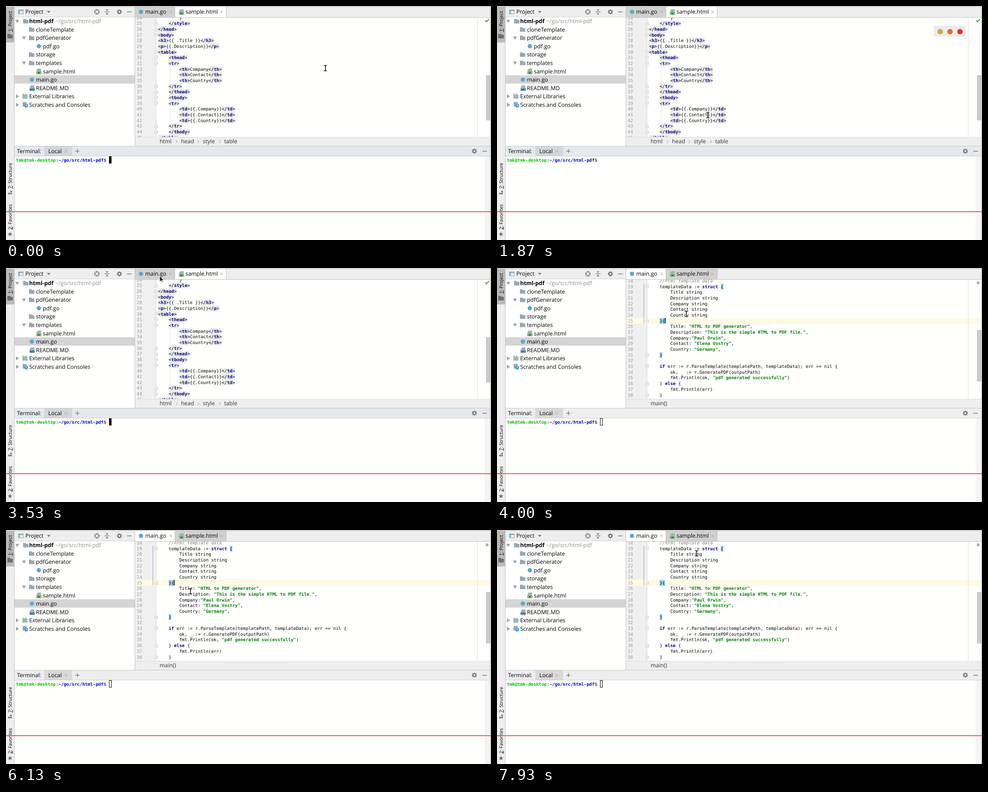
Write an HTML page with a canvas that moves like this. It is 1078x520 px and loops after 8000 ms.

```html
<!DOCTYPE html>
<html lang="en">
<head>
<meta charset="utf-8">
<title>IDE session</title>
<style>
html, body { margin: 0; width: 100%; height: 100%; overflow: hidden; background: #fffffd; }
canvas { display: block; }
</style>
</head>
<body>
<canvas id="stage" width="1078" height="520"></canvas>
<script>
const ctx = document.getElementById('stage').getContext('2d');
ctx.textRendering = 'geometricPrecision';

const LOOP = 8000, POPUP = 270, SWITCH = 3600;
const CW = 5.9, LH = 12.67, CODE_X = 338;
const UI = '"Open Sans", "Noto Sans", sans-serif';
const MONO = '"DejaVu Sans Mono", monospace';
const PAPER = '#fffffd', PANEL = '#eeeeee', EDGE = '#bfbfbf', ICON = '#6e6e6e';

// Pointer path: time, x, y
const PATH = [
  [0, 710, 138], [70, 706, 138], [450, 540, 144], [870, 458, 152], [1130, 453, 208],
  [1730, 458, 239], [2000, 477, 244], [2200, 470, 238], [2340, 470, 238], [2600, 470, 183],
  [3200, 372, 31], [3370, 338, 14], [3500, 340, 16], [4000, 421, 102], [4140, 421, 102],
  [4500, 373, 72], [4800, 386, 58], [4940, 387, 56], [5400, 405, 79], [5800, 416, 110],
  [5950, 421, 120], [6130, 410, 136], [6210, 410, 136], [6600, 369, 166], [6870, 386, 193],
  [7070, 390, 200], [7660, 460, 100], [7930, 444, 52], [8000, 442, 52]
];

const HTML_CODE = [
  '        }', '    </style>', '</head>', '<body>', '<h3>{{ .Title }}</h3>',
  '<p>{{.Description}}</p>', '<table>', '    <thead>', '    <tr>',
  '        <th>Company</th>', '        <th>Contact</th>', '        <th>Country</th>',
  '    </tr>', '    </thead>', '    <tbody>', '    <tr>',
  '        <td>{{.Company}}</td>', '        <td>{{.Contact}}</td>', '        <td>{{.Country}}</td>',
  '    </tr>', '    </tbody>', '</table>'
];
const GO_CODE = [
  '    //html template data', '    templateData := struct {', '        Title string',
  '        Description string', '        Company string', '        Contact string',
  '        Country string', '    }{', '        Title: "HTML to PDF generator",',
  '        Description: "This is the simple HTML to PDF file.",',
  '        Company:"Paul Orwin",', '        Contact: "Elena Vostry",', '        Country: "Germany",',
  '    }', '', '    if err := r.ParseTemplate(templatePath, templateData); err == nil {',
  '        ok, _ := r.GeneratePDF(outputPath)', '        fmt.Println(ok, "pdf generated successfully")',
  '    } else {', '        fmt.Println(err)', '    }', '}'
];

function rect(x, y, w, h, color) {
  ctx.fillStyle = color;
  ctx.fillRect(x, y, w, h);
}

function dot(x, y, r, color) {
  ctx.fillStyle = color;
  ctx.beginPath();
  ctx.arc(x, y, r, 0, 7);
  ctx.fill();
}

function poly(points, fill, stroke, width = 1) {
  ctx.beginPath();
  points.forEach(([x, y], i) => i ? ctx.lineTo(x, y) : ctx.moveTo(x, y));
  if (fill) {
    ctx.closePath();
    ctx.fillStyle = fill;
    ctx.fill();
  }
  if (stroke) {
    ctx.strokeStyle = stroke;
    ctx.lineWidth = width;
    ctx.stroke();
  }
}

function label(str, x, mid, color = '#000', weight = 400, size = 12.4) {
  ctx.font = `${weight} ${size}px ${UI}`;
  ctx.fillStyle = color;
  ctx.fillText(str, x, mid + size * 0.36);
}

function mono(str, x, mid, color = '#000', weight = 400) {
  ctx.font = `${weight} 9.8px ${MONO}`;
  ctx.fillStyle = color;
  ctx.fillText(str, x, mid + 3.4);
}

// Small icons

function folder(x, y, color = '#9aa7b0') {
  poly([[x - 6, y - 5], [x - 1, y - 5], [x + 1, y - 3], [x + 6, y - 3], [x + 6, y + 5], [x - 6, y + 5]], color);
}

function page(x, y, badge, letters) {
  poly([[x - 2, y - 6], [x + 5, y - 6], [x + 5, y + 1], [x - 5, y + 1], [x - 5, y - 3]], '#a5b0b8');
  rect(x - 6, y, 12, 6.5, badge);
  label(letters, x - (letters.length > 1 ? 5 : 2.5), y + 3.2, '#253525', 700, 6.5);
}

function arrow(x, y, open) {
  poly(open ? [[x - 4.5, y - 3], [x + 4.5, y - 3], [x, y + 4]]
            : [[x - 3, y - 4.5], [x + 4, y], [x - 3, y + 4.5]], '#a3a3a3');
}

function gear(x, y) {
  ctx.strokeStyle = ICON;
  ctx.lineWidth = 2;
  ctx.beginPath();
  ctx.arc(x, y, 3.2, 0, 7);
  ctx.stroke();
  for (let i = 0; i < 8; i++) {
    const c = Math.cos(i * Math.PI / 4), s = Math.sin(i * Math.PI / 4);
    poly([[x + c * 4, y + s * 4], [x + c * 5.6, y + s * 5.6]], null, ICON, 2);
  }
}

function cross(x, y) {
  poly([[x - 3, y - 3], [x + 3, y + 3]], null, '#a8a8a8');
  poly([[x + 3, y - 3], [x - 3, y + 3]], null, '#a8a8a8');
}

function sideLabel(str, y) {
  ctx.save();
  ctx.translate(9, y);
  ctx.rotate(-Math.PI / 2);
  label(str, 0, 0, '#000', 400, 10.6);
  rect(0, 5, 6, 1, '#000');
  ctx.restore();
}

function drawSidebar() {
  rect(0, 2, 18, 518, PANEL);
  rect(0, 2, 18, 79, '#bababa');
  rect(18, 2, 1, 518, EDGE);
  sideLabel('1: Project', 57);
  folder(9, 67, ICON);
  sideLabel('7: Structure', 406);
  rect(5, 415, 3.5, 3.5, ICON);
  rect(9.5, 415, 3.5, 3.5, ICON);
  rect(9.5, 410.5, 3.5, 3.5, ICON);
  sideLabel('2: Favorites', 497);
  const star = [];
  for (let i = 0; i < 10; i++) {
    const a = i * Math.PI / 5 - Math.PI / 2, r = i % 2 ? 2.3 : 5.6;
    star.push([9 + Math.cos(a) * r, 507 + Math.sin(a) * r]);
  }
  poly(star, ICON);
}

function drawProject() {
  rect(19, 2, 267, 22, PANEL);
  rect(19, 24, 267, 1, '#d4d4d4');
  rect(27, 8, 12, 10, '#9aa7b0');
  rect(28, 11, 10, 6, '#e3eaee');
  rect(28, 11, 3, 6, '#74bfe0');
  label('Project', 43, 13);
  poly([[91, 11], [99, 11], [95, 15.5]], '#777');

  ctx.strokeStyle = ICON;
  ctx.lineWidth = 1.4;
  ctx.beginPath();
  ctx.arc(202, 13, 5, 0, 7);
  ctx.stroke();
  for (const [dx, dy] of [[1, 0], [-1, 0], [0, 1], [0, -1]])
    poly([[202 + dx * 2, 13 + dy * 2], [202 + dx * 6, 13 + dy * 6]], null, ICON, 1.4);
  rect(219, 12.4, 11, 1.3, ICON);
  poly([[221.5, 7.5], [227.5, 7.5], [224.5, 11]], ICON);
  poly([[221.5, 18.5], [227.5, 18.5], [224.5, 15]], ICON);
  gear(252, 13);
  rect(269, 12.4, 10, 1.4, ICON);

  const row = i => 33.7 + 18.57 * i;
  rect(19, 154, 267, 18.5, '#d4d4d4');
  arrow(25, row(0), true);
  folder(44, row(0));
  label('html-pdf', 51.5, row(0), '#000', 700);
  label('~/go/src/html-pdf', 109.5, row(0), '#8c8c8c');
  folder(57, row(1));
  label('cloneTemplate', 66.5, row(1));
  arrow(40, row(2), true);
  folder(57, row(2));
  label('pdfGenerator', 66.5, row(2));
  dot(73, row(3), 4.8, '#5aa9cc');
  label('pdf.go', 82, row(3));
  folder(57, row(4));
  label('storage', 66.5, row(4));
  arrow(40, row(5), true);
  folder(57, row(5));
  label('templates', 66.5, row(5));
  page(73, row(6), '#7fc57c', 'H');
  label('sample.html', 82, row(6));
  dot(57.5, row(7), 4.8, '#5aa9cc');
  label('main.go', 66.5, row(7));
  page(58, row(8), '#8cc3e0', 'MD');
  label('README.MD', 66.5, row(8));
  arrow(25, row(9), false);
  ['#7d93a0', '#62b543', '#7d93a0', '#40b6e0'].forEach((c, i) =>
    rect(37 + i * 2.8, row(9) - 6 + (i % 2) * 2, 2, 11 - (i % 2) * 2, c));
  label('External Libraries', 51.5, row(9));
  arrow(25, row(10), false);
  rect(37, row(10) - 6, 9, 10, '#9aa7b0');
  dot(45, row(10) + 2, 4.3, '#40a7d2');
  poly([[45, row(10) - 0.5], [45, row(10) + 2], [47, row(10) + 3]], null, '#fff');
  label('Scratches and Consoles', 51.5, row(10));
  rect(286, 2, 1, 310, EDGE);
}

function drawTabs(goOpen) {
  rect(287, 2, 789, 23, PANEL);
  rect(287, 2, 88, 23, goOpen ? PAPER : '#d1d1d1');
  rect(376, 2, 113, 23, goOpen ? '#d1d1d1' : PAPER);
  rect(375, 2, 1, 23, EDGE);
  rect(489, 2, 1, 23, EDGE);
  rect(287, 25, 789, 1, EDGE);
  dot(300, 13, 4.8, '#5aa9cc');
  label('main.go', 309.5, 13);
  cross(366, 13);
  page(390, 13, '#7fc57c', 'H');
  label('sample.html', 399, 13);
  cross(479, 13);
}

function foldMark(y, closing) {
  const d = closing ? -1 : 1;
  poly([[330.5, y - 3.5 * d], [337, y - 3.5 * d], [337, y + 1.5 * d],
        [333.75, y + 4 * d], [330.5, y + 1.5 * d]], PAPER, '#c4c4c4');
  rect(332, y - 0.5, 4, 1, '#aaa');
}

function codeLine(line, y, pattern, style) {
  let col = 0;
  for (const part of line.split(pattern)) {
    if (part) style(part, CODE_X + col * CW, y);
    col += part.length;
  }
}

function tagPart(part, x, y) {
  const tag = part.match(/^(<\/?)(\w+)>$/);
  if (!tag) return mono(part, x, y);
  rect(x, y - 6.3, part.length * CW, LH, '#ececec');
  mono(tag[1], x, y);
  mono(tag[2], x + tag[1].length * CW, y, '#000080', 700);
  mono('>', x + (part.length - 1) * CW, y);
}

function goPart(part, x, y) {
  if (part.startsWith('//')) {
    ctx.font = `italic 9.8px ${MONO}`;
    ctx.fillStyle = '#808080';
    ctx.fillText(part, x, y + 3.4);
  } else if (part[0] === '"') mono(part, x, y, '#008000', 700);
  else if (/^(struct|if|else)$/.test(part)) mono(part, x, y, '#000080', 700);
  else mono(part, x, y);
}

function scrollThumb(y, h) {
  rect(1067, y, 9, h, '#b9b9b9');
  rect(1068, y + 1, 7, h - 2, '#cbcbcb');
}

function drawEditor(goOpen, t) {
  const first = goOpen ? 18 : 24;
  const top = goOpen ? 28.7 : 26.3;
  const lineY = n => top + (n - first) * LH;
  const code = goOpen ? GO_CODE : HTML_CODE;

  ctx.save();
  ctx.beginPath();
  ctx.rect(287, 26, 789, 265);
  ctx.clip();
  rect(287, 26, 789, 265, PAPER);
  rect(287, 26, 46, 265, '#f0f0f0');
  if (goOpen) {
    rect(287, 111, 789, 12.6, '#fffae3');
    // Matching braces: line, column, length
    for (const [n, col, len] of [[19, 27, 1], [25, 4, 2], [31, 4, 1]])
      rect(CODE_X + col * CW, lineY(n) - 6.3, len * CW, LH, '#99d3f2');
    rect(326, 35, 1, 88, '#86a3bd');
  } else {
    rect(364, lineY(33) - 6, 1, LH * 3, '#e2e2e2');
    rect(364, lineY(40) - 6, 1, LH * 3, '#e2e2e2');
  }
  rect(333, 26, 1, 265, '#d9d9d9');
  rect(1047, 26, 1, 265, '#dcdcdc');

  code.forEach((line, i) => {
    const y = top + i * LH;
    mono(String(first + i), 290.5, y, '#999');
    if (goOpen) codeLine(line, y, /(\/\/.*|"[^"]*"|\b(?:struct|if|else)\b)/, goPart);
    else codeLine(line, y, /(<\/?\w+>)/, tagPart);
  });

  const opens = goOpen ? [19, 33] : [27, 30, 31, 32, 38, 39];
  const closes = goOpen ? [25, 31, 36, 38] : [25, 26, 36, 37, 43, 44];
  opens.forEach(n => foldMark(lineY(n), false));
  closes.forEach(n => foldMark(lineY(n), true));

  if (goOpen) {
    if ((t - 3960 + LOOP) % 1000 < 500) rect(373, 111, 1.6, 12, '#000');
    rect(1067, 30, 1.6, 6, ICON);
    rect(1070, 30, 1.6, 6, ICON);
    scrollThumb(138, 114);
  } else {
    poly([[1065.5, 32], [1068, 35], [1073.5, 29]], null, '#3fa046', 2);
    scrollThumb(154, 100);
  }
  ctx.restore();

  rect(287, 291, 789, 21, PANEL);
  rect(287, 291, 789, 1, '#dedede');
  if (goOpen) label('main()', 341.5, 301, '#333');
  else ['html', 'head', 'style', 'table'].forEach((s, i) => {
    const x = [341.5, 389, 437.5, 485][i];
    label(s, x, 301, '#333');
    if (i) poly([[x - 11, 298.5], [x - 8.5, 301.5], [x - 11, 304.5]], null, '#888');
  });
}

function drawPopup() {
  ctx.fillStyle = '#ebebeb';
  ctx.beginPath();
  ctx.roundRect(971, 44, 71, 24, 3);
  ctx.fill();
  dot(985, 57, 6, '#d9a441');
  dot(1007, 57, 6, '#d96f2b');
  dot(1029, 57, 6, '#e0312f');
}

function drawTerminal(goOpen, t) {
  // The header is tinted while the terminal has the focus
  rect(19, 312, 1057, 21, goOpen ? PANEL : '#e5e9ed');
  rect(85, 312, 62, 21, goOpen ? '#d9d9d9' : '#d2d6da');
  rect(19, 311, 1057, 1, '#c6c6c6');
  rect(19, 333, 1057, 1, '#cccccc');
  label('Terminal:', 24.5, 322.5);
  label('Local', 94, 322.5);
  cross(133, 323);
  rect(154, 322, 9, 1.3, ICON);
  rect(158, 318, 1.3, 9, ICON);
  gear(1041, 322.5);
  rect(1059, 322, 10, 1.4, ICON);
  rect(1064, 334, 12, 186, '#f4f4f3');

  let x = 22;
  for (const [s, color, weight] of [['tmk@tmk-desktop', '#00c200', 700], [':', '#000', 400],
      ['~/go/src/html-pdf', '#0000e0', 700], ['$', '#000', 400]]) {
    mono(s, x, 343, color, weight);
    x += s.length * 5.91;
  }
  if (goOpen) {
    ctx.strokeStyle = '#000';
    ctx.lineWidth = 1;
    ctx.strokeRect(229.5, 334.5, 5, 15);
  } else if (t % 1010 < 505) rect(229, 334, 5.5, 16, '#000');
}

// Smooth curve through the path that never overshoots a point
function slope(i, k) {
  if (i === 0 || i === PATH.length - 1) return 0;
  const [a, b, c] = [PATH[i - 1], PATH[i], PATH[i + 1]];
  const s = (b[k] - a[k]) / (b[0] - a[0]), r = (c[k] - b[k]) / (c[0] - b[0]);
  return s * r > 0 ? 2 * s * r / (s + r) : 0;
}

function pointerAt(t) {
  let i = 1;
  while (i < PATH.length - 1 && PATH[i][0] < t) i++;
  const a = PATH[i - 1], b = PATH[i], d = b[0] - a[0], u = (t - a[0]) / d, v = 1 - u;
  return [1, 2].map(k =>
    v * v * ((1 + 2 * u) * a[k] + u * d * slope(i - 1, k)) +
    u * u * ((3 - 2 * u) * b[k] - v * d * slope(i, k)));
}

function drawPointer(x, y) {
  if (y < 25) {
    const tip = [[0, 0], [0, 13], [3, 10], [5, 14.5], [7, 13.5], [5, 9.5], [9, 9.5], [0, 0]];
    poly(tip.map(([a, b]) => [x + a, y + b]), '#111', '#fff');
    return;
  }
  for (const [color, width] of [['#fff', 3.2], ['#111', 1.6]]) {
    for (const d of [-1, 1])
      poly([[x - 3.5, y + 6 * d], [x - 1, y + 6 * d], [x, y + 5 * d],
            [x + 1, y + 6 * d], [x + 3.5, y + 6 * d]], null, color, width);
    poly([[x, y - 5], [x, y + 5]], null, color, width);
  }
}

function draw(t) {
  const goOpen = t >= SWITCH;
  const [x, y] = pointerAt(t);
  rect(0, 0, 1078, 520, PAPER);
  rect(0, 0, 1078, 1, '#ececec');
  drawSidebar();
  drawProject();
  drawTabs(goOpen);
  drawEditor(goOpen, t);
  if (!goOpen && t >= POPUP && y > 25) drawPopup();
  drawTerminal(goOpen, t);
  rect(0, 1, 1078, 1, '#b5b5b5');
  rect(1076, 2, 2, 518, '#e8e8e8');
  rect(1076, 2, 1, 518, EDGE);
  rect(0, 456.3, 1078, 1.6, '#ee3030');
  drawPointer(x, y);
}

const start = performance.now();
function tick() {
  draw((performance.now() - start) % LOOP);
  requestAnimationFrame(tick);
}
tick();
</script>
</body>
</html>
```
